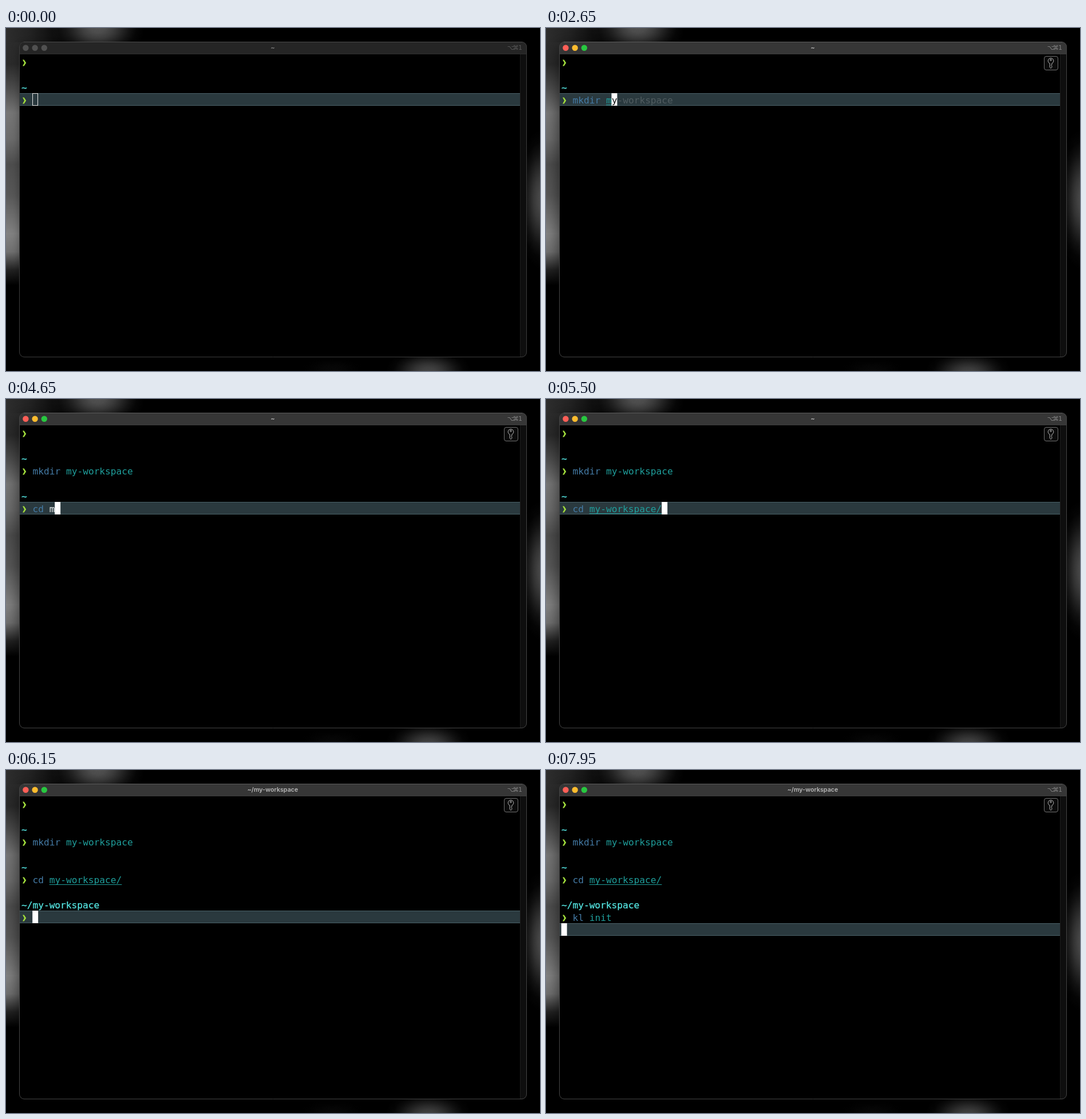
Recreate the animation shown at these times as an HTML page with a canvas. Size 933 by 600 pixels, loop 8000 ms.

```html
<!DOCTYPE html>
<html lang="en">
<head>
<meta charset="utf-8">
<title>Terminal</title>
<style>
  html, body { margin: 0; width: 100%; height: 100%; overflow: hidden; background: #000; }
  canvas { display: block; }
</style>
</head>
<body>
<canvas id="stage" width="933" height="600"></canvas>
<script>
const ctx = document.getElementById('stage').getContext('2d');
const LOOP = 8000, FOCUS = 350;
const CELL = 9.75, ROW = 22, LEFT = 26.9, TOP = 48;
const MONO = '16.2px "DejaVu Sans Mono", monospace';
const COLORS = {
  command: '#447ba6', arg: '#1f9f9c', path: '#55e6e3', prompt: '#a0dc3c',
  hint: '#505c60', guide: '#2a393e', guideEdge: '#4a6067', plain: '#e8eeee'
};

// Each command: key times, the time a completion fills the rest, run and done times.
const commands = [
  { row: 3, dir: '~', text: 'mkdir my-workspace', split: 5, hintFrom: 1000,
    keys: [1000, 1150, 1300, 1450, 1600, 1850, 2650], fill: 3000, run: 3400, done: 3700 },
  { row: 6, dir: '~', text: 'cd my-workspace/', split: 2, hintFrom: Infinity,
    keys: [4000, 4200, 4400, 4650, 4850], fill: 5200, run: 5700, done: 5950, path: true },
  { row: 9, dir: '~/my-workspace', text: 'kl init', split: 2, hintFrom: Infinity,
    keys: [7000, 7100, 7200, 7300, 7400, 7500, 7600], fill: Infinity, run: 7875, done: Infinity }
];

const colX = col => LEFT + col * CELL;
const rowY = row => TOP + row * ROW;

function rect(x, y, w, h, color) {
  ctx.fillStyle = color;
  ctx.fillRect(x, y, w, h);
}

function roundRect(x, y, w, h, r) {
  ctx.beginPath();
  ctx.roundRect(x, y, w, h, r);
}

function disc(x, y, r, color) {
  ctx.fillStyle = color;
  ctx.beginPath();
  ctx.arc(x, y, r, 0, 7);
  ctx.fill();
}

// Stops are pairs of position and grey level.
function ramp(x0, y0, x1, y1, stops) {
  const g = ctx.createLinearGradient(x0, y0, x1, y1);
  for (const [at, v] of stops) g.addColorStop(at, `rgb(${v},${v},${v})`);
  return g;
}

function glow(x, y, rx, ry, level, alpha) {
  ctx.save();
  ctx.translate(x, y);
  ctx.scale(rx, ry);
  const g = ctx.createRadialGradient(0, 0, 0, 0, 0, 1);
  for (let i = 0; i <= 6; i++) {
    const fade = Math.cos(i / 6 * Math.PI / 2) ** 2;
    g.addColorStop(i / 6, `rgba(${level},${level},${level},${alpha * fade})`);
  }
  ctx.fillStyle = g;
  ctx.fillRect(-1, -1, 2, 2);
  ctx.restore();
}

function drawBackdrop(focused) {
  rect(0, 0, 933, 600, '#000');
  rect(0, 0, 30, 450, ramp(0, 0, 0, 450, [
    [0, 45], [.14, 42], [.23, 75], [.33, 118], [.43, 108], [.53, 78],
    [.65, 88], [.8, 130], [.87, 112], [.94, 34], [1, 0]]));
  rect(0, 0, 120, 25, ramp(0, 0, 120, 0, [[0, 45], [.35, 34], [.8, 8], [1, 0]]));
  glow(160, -2, 82, 62, 82, 1);
  glow(938, 300, 50, 122, 74, 1);
  glow(738, 602, 74, 46, 68, 1);
  glow(570, 596, 55, 20, 14, .5);

  ctx.save();
  ctx.shadowColor = `rgba(0,0,0,${focused ? .6 : .35})`;
  ctx.shadowBlur = focused ? 26 : 16;
  ctx.shadowOffsetY = focused ? 6 : 3;
  roundRect(23, 24, 887, 552, 9);
  ctx.fillStyle = '#000';
  ctx.fill();
  ctx.restore();
}

function drawKeyBadge() {
  roundRect(870.5, 49.5, 24, 24, 3.5);
  ctx.fillStyle = '#0b0b0b';
  ctx.fill();
  ctx.strokeStyle = '#707070';
  ctx.lineWidth = 1;
  ctx.stroke();
  ctx.strokeStyle = '#b8b8b8';
  ctx.beginPath();
  ctx.arc(882, 57.5, 4.8, 1.95, 1.19);
  ctx.lineTo(883.8, 64);
  ctx.lineTo(882.8, 65.3);
  ctx.lineTo(883.8, 66.7);
  ctx.lineTo(883.8, 68.5);
  ctx.lineTo(882, 70.5);
  ctx.lineTo(880.2, 68.5);
  ctx.closePath();
  ctx.stroke();
  ctx.beginPath();
  ctx.arc(882, 55.8, 1.3, 0, 7);
  ctx.stroke();
}

function drawWindow(focused, title) {
  ctx.save();
  roundRect(23, 24, 887, 552, 9);
  ctx.clip();
  rect(23, 24, 887, 22, focused ? '#363636' : '#252525');
  rect(23, 45, 887, 1, focused ? '#3c3c3c' : '#2e2e2e');
  rect(898, 46, 12, 530, '#0e0e0e');
  rect(898, 46, 1, 530, '#1d1d1d');
  ctx.restore();

  roundRect(23.5, 24.5, 886, 551, 8.5);
  ctx.strokeStyle = focused ? '#444' : '#3c3c3c';
  ctx.lineWidth = 1;
  ctx.stroke();
  rect(31, 24, 871, 1, focused ? '#5c5c5c' : '#4a4a4a');

  const lights = focused ? ['#ff5f57', '#febc2e', '#28c840'] : ['#505050', '#505050', '#505050'];
  lights.forEach((color, i) => disc(34.4 + i * 16.2, 34.8, 5.2, color));

  ctx.textAlign = 'center';
  ctx.fillStyle = focused ? '#b9b9b9' : '#838383';
  ctx.font = '600 10.7px Inter, sans-serif';
  ctx.fillText(title, 466, 38.3);
  ctx.fillStyle = focused ? '#858585' : '#595959';
  ctx.font = '10.5px "DejaVu Sans", sans-serif';
  ['⌥', '⌘', '1'].forEach((ch, i) => ctx.fillText(ch, [881.5, 890.8, 898.7][i], 37.7));
  ctx.textAlign = 'left';
}

function drawPrompt(row) {
  const y = rowY(row) + 13;
  ctx.fillStyle = COLORS.prompt;
  ctx.beginPath();
  [[29, -5.5], [31.6, -5.5], [35.2, 0], [31.6, 5.6], [29, 5.6], [32, 0]]
    .forEach(([x, dy]) => ctx.lineTo(x, y + dy));
  ctx.fill();
}

function drawText(text, col, row, color, strong) {
  ctx.font = MONO;
  ctx.fillStyle = ctx.strokeStyle = color;
  ctx.fillText(text, colX(col), rowY(row) + 17.8);
  if (strong) {
    ctx.lineWidth = .25;
    ctx.strokeText(text, colX(col), rowY(row) + 17.8);
  }
}

function drawGuide(row) {
  const y = rowY(row);
  rect(24, y, 874, ROW, COLORS.guide);
  rect(24, y, 874, 1, COLORS.guideEdge);
  rect(24, y + ROW - 1, 874, 1, COLORS.guideEdge);
}

function drawCursor(col, row, focused, under) {
  const x = colX(col), y = rowY(row);
  if (!focused) {
    ctx.strokeStyle = '#e6e6e6';
    ctx.lineWidth = 1;
    ctx.strokeRect(46.5, y + .5, 9, ROW - 1);
    return;
  }
  rect(x - .2, y, CELL + .2, ROW, '#fff');
  if (under) drawText(under, col, row, '#111');
}

function drawCommand(cmd, t, focused) {
  const { row, text, split } = cmd;
  const running = t >= cmd.run;
  const typed = cmd.keys.filter(k => k <= t).length;
  const length = t >= cmd.fill || running ? text.length : typed;
  const argCol = split + 1;

  if (!running) drawGuide(row);
  drawText(cmd.dir, 0, row - 1, COLORS.path, true);
  drawPrompt(row);
  drawText(text.slice(0, Math.min(length, split)), 2, row, COLORS.command);

  if (length > argCol) {
    const fresh = cmd.path && t < 4700;
    drawText(text.slice(argCol, length), 2 + argCol, row, fresh ? COLORS.plain : COLORS.arg);
    const underlined = cmd.path ? !fresh : cmd.row === 3 && !running && length < text.length;
    if (underlined) {
      rect(colX(2 + argCol), rowY(row) + 20, (length - argCol) * CELL, 1, COLORS.arg);
    }
  }

  if (running) {
    if (t < cmd.done) {
      drawGuide(row + 1);
      drawCursor(0, row + 1, focused);
    }
    return;
  }
  const hint = t >= cmd.hintFrom ? text.slice(length) : '';
  drawText(hint.slice(1), 3 + length, row, COLORS.hint);
  drawCursor(2 + length, row, focused, hint[0]);
}

function draw(t) {
  const focused = t >= FOCUS;
  drawBackdrop(focused);
  drawWindow(focused, t >= commands[1].done ? '~/my-workspace' : '~');
  drawPrompt(0);
  commands.forEach((cmd, i) => {
    if (i === 0 || t >= commands[i - 1].done) drawCommand(cmd, t, focused);
  });
  if (focused) drawKeyBadge();
}

const start = performance.now();
function tick() {
  draw((performance.now() - start) % LOOP);
  requestAnimationFrame(tick);
}
tick();
</script>
</body>
</html>
```
